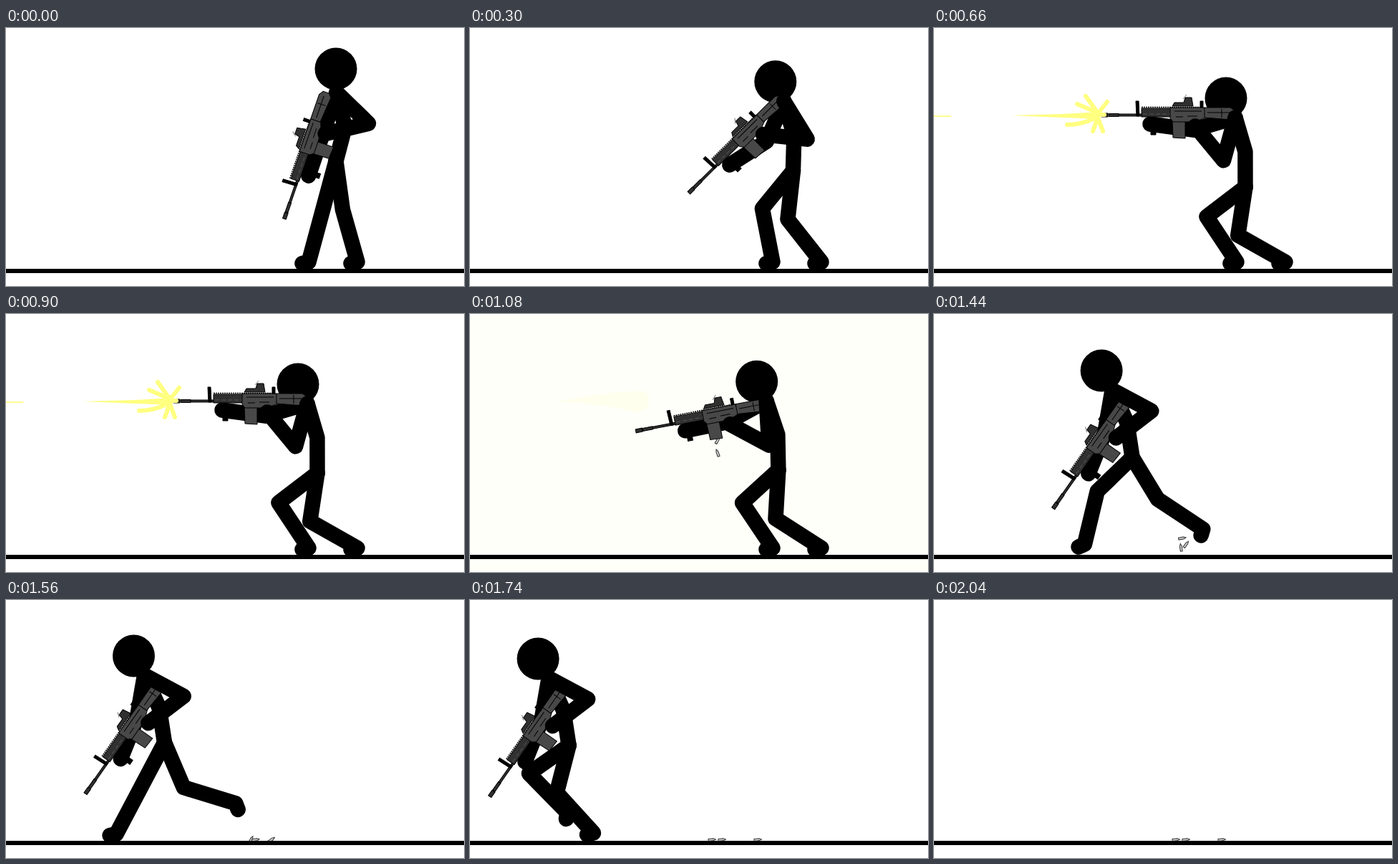
These frames come from a looping animation (640 px wide and 360 px high, 2.64 s). An HTML page:

```html
<!DOCTYPE html>
<html lang="en">
<head>
<meta charset="utf-8">
<title>Stick figure</title>
<style>
html, body { margin: 0; width: 100%; height: 100%; overflow: hidden; background: #fff; }
svg { display: block; width: 100vw; height: 100vh; }
.limb { fill: none; stroke: #000; stroke-width: 21.5; stroke-linecap: round; stroke-linejoin: round; }
#gun { stroke: #000; stroke-width: 1; fill: #484848; }
#gun .dark { fill: #303030; }
#gun .black { fill: #000; }
#burst path { fill: none; stroke: #ffff80; stroke-width: 6; stroke-linecap: round; }
#burst .solid { fill: #ffff80; stroke: none; }
.shell { fill: #ccc; stroke: #333; stroke-width: 1; }
</style>
</head>
<body>
<svg viewBox="0 0 640 360">
  <rect id="tint" width="640" height="360" fill="#fffffa"/>
  <path id="smoke" fill="#ffff80" d="M120 122Q200 108 240 107Q252 110 250 122Q250 135 235 137Q180 125 120 122Z"/>
  <g id="shells"></g>
  <g id="figure">
    <path id="farArm" class="limb"/>
    <path id="torso" class="limb"/>
    <path id="leg1" class="limb"/>
    <path id="leg2" class="limb"/>
    <circle id="head" r="29.5"/>
    <g id="gun">
      <path class="black" d="M-117 14h7v15h-7z"/>
      <path class="dark" d="M-166 0h40v3h-40z"/>
      <path class="dark" d="M-186-1h9v5h-9zM-176-.5h14v4h-14z"/>
      <path class="black" d="M-138-18h4l1 21h-4z"/>
      <path d="M-87 9h18v25l-17-1z"/>
      <path class="dark" d="M-130-8h46v12h-46z"/>
      <path d="M-128 0h42" stroke="#555" stroke-dasharray="6 3"/>
      <path d="M-130-9.5h82" stroke-width="1.5" stroke-dasharray="2 1"/>
      <path d="M-90-9h48l2 14-16 6h-30l-4-5z"/>
      <path d="M-84-4h38M-82 4h10M-66 3h14"/>
      <path class="dark" d="M-87-11l3-5h13l2-7h9l2 12z"/>
      <path d="M-72-21l5-6" stroke="#777"/>
      <path class="black" d="M-48-18h4v9h-4z"/>
      <path d="M-42-9h36l6 4v10l-5 3-37-3z"/>
      <path d="M-38-2h32M-18-7v12"/>
    </g>
    <path id="nearArm" class="limb"/>
  </g>
  <g id="burst">
    <path class="solid" d="M107 122L180 120L232 117V127L180 125ZM0 122.3H24V124H0Z"/>
    <path d="M230 120L212 95M228 118L200 106M230 118L242 103M228 122L236 144M230 122L222 144M222 127Q205 135 186 135M215 121H238"/>
  </g>
  <rect y="336" width="640" height="6"/>
</svg>
<script>
const STEP = 60, LOOP = 2640, LAST = 34;
const AIMED = 9, FIRST_SHOT = 11, LAST_SHOT = 15;
const SPEED = 27.8, FLOOR = 326.5;

// neck is relative to the hip; head and gun butt are relative to the neck.
const stand = { neck: [1, -96], head: [-1, -33], gun: [-14, 0], angle: -71 };
const aim = { neck: [-14, -97], head: [-13, -27], gun: [-1, -5], angle: 0 };
const run = { neck: [-28, -94], head: [-15, -27], gun: [23, 12], angle: -55 };
const standingFeet = [[423, FLOOR], [491, FLOOR]];
const shellRest = [338, 402, 352];

const $ = id => document.getElementById(id);
const set = (id, name, value) => $(id).setAttribute(name, value);
const show = (id, on) => set(id, 'visibility', on ? 'visible' : 'hidden');
const line = (id, ...points) => set(id, 'd', 'M' + points.join('L'));

const clamp = v => Math.min(1, Math.max(0, v));
const smooth = v => clamp(v) ** 2 * (3 - 2 * clamp(v));
const mix = (a, b, p) => a + (b - a) * p;
const mix2 = (a, b, p, q = p) => [mix(a[0], b[0], p), mix(a[1], b[1], q)];
const add = (a, b) => [a[0] + b[0], a[1] + b[1]];
const rad = degrees => degrees * Math.PI / 180;
const cosd = degrees => Math.cos(rad(degrees));
const sind = degrees => Math.sin(rad(degrees));
const turn = ([x, y], d) => [x * cosd(d) - y * sind(d), x * sind(d) + y * cosd(d)];

// Middle joint of a two-part limb; side picks the way it bends.
function joint(a, b, la, lb, side) {
  const dx = b[0] - a[0], dy = b[1] - a[1], d = Math.hypot(dx, dy);
  if (d >= la + lb) return mix2(a, b, la / (la + lb));
  const along = (la * la - lb * lb + d * d) / (2 * d);
  const out = side * Math.sqrt(Math.max(0, la * la - along * along));
  return [a[0] + (dx * along - dy * out) / d, a[1] + (dy * along + dx * out) / d];
}

// Stand to aim, then aim to run: the lean leads, the crouch and gun follow.
function poseAt(n) {
  const p = clamp(n / AIMED), lean = 1 - (1 - p) ** 3, crouch = p ** 1.7;
  const go = smooth((n - 16) / 7);
  const start = 0.4 * Math.log(1 + Math.exp((n - 18.32) / 0.4));
  const bob = 3 * cosd(60 * (n - 25.2));
  const blend = (key, q, goX = go, goY = go) => mix2(mix2(stand[key], aim[key], q), run[key], goX, goY);
  const hip = [
    mix(461, 435, crouch) - SPEED * start,
    mix(mix(186, 222, crouch), 201 - bob, go)
  ];
  const neck = add(hip, blend('neck', lean));
  return {
    hip, neck,
    head: add(neck, blend('head', lean)),
    butt: add(neck, blend('gun', lean, go * go, go ** 0.3)),
    angle: mix(mix(stand.angle, aim.angle, crouch), run.angle, go)
  };
}

// Each foot circles below the hip, half a turn apart.
function footAt(n, i, hip) {
  const phase = 25.5 * (n - 24) - 26 + (i ? 0 : 180);
  const stride = smooth((n - 18) / 4);
  const lift = 44 * Math.max(0, 0.36 + 0.64 * cosd(phase - 222)) * stride;
  const x = mix(standingFeet[i][0], hip[0] + 16 - 92 * cosd(phase), stride);
  const ankle = [x, FLOOR - lift];
  return { ankle, toe: add(ankle, turn([-9, 2], -2.3 * lift)) };
}

function drawFigure(n, firing) {
  const { hip, neck, head, butt, angle } = poseAt(n);
  const grip = add(butt, turn([-55, 17], angle));
  const guard = add(butt, turn([-118, 14], angle));

  line('torso', neck, joint(neck, hip, 49.5, 49.5, -1), hip);
  line('nearArm', neck, joint(neck, grip, 62, 62, -1), grip);
  line('farArm', neck, joint(neck, guard, 61, 61, -1), guard);
  for (const i of [0, 1]) {
    const { ankle, toe } = footAt(n, i, hip);
    line('leg' + (i + 1), hip, joint(hip, ankle, 68, 76, 1), ankle, toe);
  }
  set('head', 'cx', head[0]);
  set('head', 'cy', head[1]);
  set('gun', 'transform', `translate(${butt}) rotate(${angle})`);
  show('figure', n < LAST);
  show('burst', firing);
}

const shells = shellRest.map(() => {
  const p = document.createElementNS('http://www.w3.org/2000/svg', 'path');
  p.setAttribute('class', 'shell');
  p.setAttribute('d', 'M-5-1.5H2L5.5 0L2 1.5H-5Z');
  $('shells').append(p);
  return p;
});

function drawShell(shell, i, n) {
  const age = n - LAST_SHOT - i;
  const slide = clamp((n - 22) / 6) ** 2;
  const x = mix(346, shellRest[i], slide);
  const y = Math.min(334.5, 128 + age * (22 + 2.2 * i));
  const spin = mix(50 * i - 110, -5, slide);
  shell.setAttribute('visibility', age < 0 ? 'hidden' : 'visible');
  shell.setAttribute('transform', `translate(${x} ${y}) rotate(${spin})`);
}

function draw(ms) {
  const n = Math.min(LAST, Math.floor(ms % LOOP / STEP));
  const firing = n >= FIRST_SHOT && n <= LAST_SHOT && n % 2 === 1;
  const smoking = n > FIRST_SHOT && n < 19 && !firing;
  drawFigure(n, firing);
  set('smoke', 'opacity', smoking ? 0.6 * 0.42 ** Math.max(0, n - LAST_SHOT - 1) : 0);
  show('tint', smoking && n > LAST_SHOT + 1);
  shells.forEach((shell, i) => drawShell(shell, i, n));
}

const start = performance.now();
function tick() {
  draw(performance.now() - start);
  requestAnimationFrame(tick);
}
tick();
</script>
</body>
</html>
```
